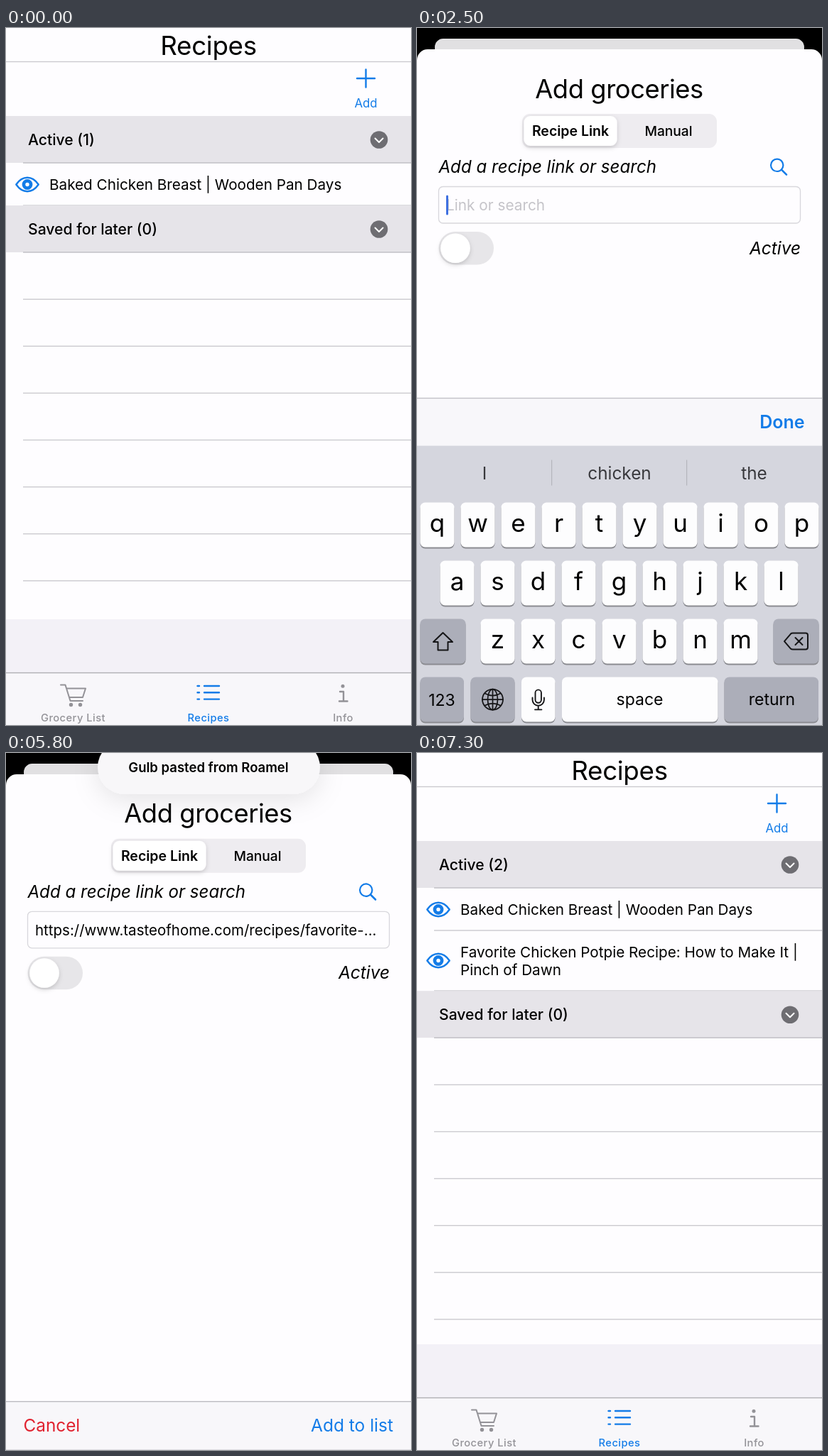
Animation, 570 px wide and 982 px high, one loop 8000 ms. Source, as an HTML page:

```html
<!DOCTYPE html>
<html lang="en">
<head>
<meta charset="utf-8">
<title>Add a recipe</title>
<style>
html, body { margin: 0; width: 100%; height: 100%; overflow: hidden; background: #000; }
svg { display: block; width: 100vw; height: 100vh; font-family: Inter, Roboto, sans-serif; }
text { white-space: pre; }
.line { fill: none; stroke-linecap: round; stroke-linejoin: round; }
</style>
</head>
<body>
<svg id="stage" viewBox="0 0 570 982"></svg>
<script>
const BLUE = '#137ce8', WHITE = '#fefdff', GREY = '#939297', RULE = '#cbcacf', BAR = '#f8f7fa';
const URL_TEXT = 'https://www.tasteofhome.com/recipes/favorite-chicken-potpie/';

// markup helpers
const text = (x, y, size, str, more = '') => `<text x="${x}" y="${y}" font-size="${size}" ${more}>${str}</text>`;
const mid = (x, y, size, str, more = '') => text(x, y, size, str, 'text-anchor="middle" ' + more);
const end = (x, y, size, str, more = '') => text(x, y, size, str, 'text-anchor="end" ' + more);
const rect = (x, y, w, h, fill, r = 0, more = '') =>
  `<rect x="${x}" y="${y}" width="${w}" height="${h}" rx="${r}" fill="${fill}" ${more}/>`;
const rule = (y, x = 24, color = RULE) => rect(x, y - .7, 570 - x, 1.4, color);
const line = (d, color, w = 2, more = '') => `<path class="line" d="${d}" stroke="${color}" stroke-width="${w}" ${more}/>`;
const disc = (x, y, r, fill, more = '') => `<circle cx="${x}" cy="${y}" r="${r}" fill="${fill}" ${more}/>`;
const group = (id, body, more = '') => `<g id="${id}" ${more}>${body}</g>`;

const eye = y => line(`M14.3 ${y}Q21 ${y - 9.7} 30 ${y - 9.7}T45.7 ${y}Q39 ${y + 9.7} 30 ${y + 9.7}T14.3 ${y}Z`, BLUE, 2.4)
  + disc(30, y, 7.4, BLUE) + disc(30, y, 2.7, WHITE);

const section = (y, label) => rect(0, y, 570, 66, '#e6e4e9') + label + rule(y + 66, 24, '#bfbec3')
  + disc(525, y + 33.5, 12.3, '#6e6d72') + line(`M519.5 ${y + 31.5}l5.5 5.5 5.5-5.5`, '#fff');

function list() {
  let rules = '';
  for (let y = 382.2; y < 860; y += 66.1) rules += rule(y);
  return rect(0, -32, 570, 1100, WHITE, 0, 'id="cardShape"')
    + mid(285, 38, 36.7, 'Recipes', 'letter-spacing="-.3"') + rule(47.5, 0)
    + line('M506.5 58.5v25M494 71h25', BLUE, 2.4) + mid(506.5, 112, 16.8, 'Add', `fill="${BLUE}"`)
    + section(124, text(31, 165, 21.15, '', 'font-weight="500" id="count"'))
    + eye(220.5) + text(61, 228, 20.7, 'Baked Chicken Breast | Wooden Pan Days') + rule(250)
    + group('newRow', eye(292.5) + text(61, 288.5, 20.7, 'Favorite Chicken Potpie Recipe: How to Make It |')
      + text(61, 313.5, 20.7, 'Pinch of Dawn') + rule(335))
    + group('later', section(250, text(31, 291, 21.15, 'Saved for later (0)', 'font-weight="500"')) + rules)
    + rect(0, 833, 570, 76, '#f3f1f7') + rect(0, 909, 570, 200, BAR) + rule(908.5, 0, '#b0afb4')
    + line('M77 925.5h6.5l7 22.5h17.5M85 930.5h27l-4 12.5h-19', GREY, 2)
    + disc(91.5, 953.5, 2.7, GREY) + disc(104.5, 953.5, 2.7, GREY)
    + line('M279 927h21M279 936.3h21M279 945.6h21M269.5 927h2.5M269.5 936.3h2.5M269.5 945.6h2.5', BLUE, 2.4)
    + disc(474, 927.3, 2.5, GREY) + line('M470 935h5v13.5M469 948.5h11.5', GREY, 2.4)
    + [['Grocery List', 94.5, GREY], ['Recipes', 285, BLUE], ['Info', 474.5, GREY]]
      .map(([s, x, c]) => mid(x, 977, 14.7, s, `fill="${c}" font-weight="500" letter-spacing=".45"`)).join('')
    + rect(0, -32, 570, 1100, '#000', 0, 'id="dim"');
}

const form = () =>
  mid(284.5, 98.5, 36.3, 'Add groceries', 'letter-spacing="-.4"')
  + rect(148, 121, 274, 48, '#eeecf0', 11) + rect(150.5, 124, 131, 42, '#fff', 9, 'filter="url(#soft)"')
  + mid(216, 152, 19.5, 'Recipe Link', 'font-weight="600"') + mid(354, 152, 19.2, 'Manual', 'font-weight="500"')
  + text(30.5, 204, 24.1, 'Add a recipe link or search', 'font-style="italic"')
  + disc(506.7, 193.3, 8.7, 'none', `stroke="${BLUE}" stroke-width="2.2"`) + line('M513 199.7l7 7', BLUE, 2.6)
  + rect(30.5, 223.5, 509, 51.5, WHITE, 6, 'stroke="#d8d7dc" stroke-width="1.3"')
  + text(41, 257, 20.8, 'Link or search', 'fill="#c5c4c9" id="hint"')
  + `<g clip-path="url(#field)">${end(526, 257, 20.5, URL_TEXT, 'id="link"')}</g>`
  + text(41, 257, 20.5, URL_TEXT.slice(0, 45) + '...', 'id="cutLink"')
  + rect(41, 235.5, 3, 28, '#3e6fe0', 1.5, 'id="caret"')
  + rect(30.5, 287, 77.5, 46.5, '#e7e6e9', 23.2) + disc(54, 310.2, 20.8, '#fff', 'filter="url(#soft)"')
  + end(540, 318.5, 24.4, 'Active', 'font-style="italic"');

const toolbar = () => rect(0, 916, 570, 200, BAR) + rule(916.5, 0, '#bdbcc1')
  + text(24.5, 959, 24.3, 'Cancel', 'fill="#e0222f"') + end(545, 959, 24.5, 'Add to list', `fill="${BLUE}"`);

function keyboard() {
  const cap = (x, y, w, fill = '#fdfdfe') => rect(x, y + 2, w, 63, '#8b8c91', 7) + rect(x, y, w, 63, fill, 7);
  const dark = (x, y, w) => cap(x, y, w, '#acaeb9');
  const row = (letters, x0, y) => [...letters].map((c, i) =>
    cap(x0 + 57 * i, y, 48) + mid(x0 + 24 + 57 * i, y + 41.5, 35, c)).join('');
  const word = (x, s) => mid(x, 635, 24.3,
    [...s].map((c, i) => `<tspan data-delay="${i / s.length}">${c}</tspan>`).join(''), 'fill="#38383c"');
  const ink = '#151517';
  return rect(0, 521, 570, 68, BAR) + rect(0, 521, 570, 68, 'url(#edge)', 0, 'id="sheen"') + rule(521, 0, '#c2c1c6')
    + end(545.5, 563.5, 25, 'Done', `fill="${BLUE}" font-weight="600"`)
    + rect(0, 588, 570, 420, '#d5d6de')
    + rect(189, 608, 1.2, 36, '#b4b5bc') + rect(379, 608, 1.2, 36, '#b4b5bc')
    + group('words', word(95, 'I') + word(285, 'chicken') + word(474.5, 'the'))
    + row('qwertyuiop', 4.5, 668) + row('asdfghjkl', 32.5, 750) + row('zxcvbnm', 89.5, 832)
    + dark(4.5, 832, 64) + line('M36.5 851.5L50 864.5H43.5V876H29.5V864.5H23Z', ink)
    + dark(501.5, 832, 64)
    + line('M517 863.5L526 853Q527 852 529 852H547Q550 852 550 855V872Q550 875 547 875H529Q527 875 526 874ZM532.5 858.5l10 10m0-10l-10 10', ink)
    + dark(4.5, 914, 61.5) + mid(35, 954, 23, '123')
    + dark(75.5, 914, 62)
    + line('M92 945.5h29M106.5 931v29M95.5 937q11 6 22 0M95.5 954q11-6 22 0', ink, 1.7)
    + disc(106.5, 945.5, 14.5, 'none', `stroke="${ink}" stroke-width="1.8"`)
    + `<ellipse cx="106.5" cy="945.5" rx="7" ry="14.5" fill="none" stroke="${ink}" stroke-width="1.7"/>`
    + cap(147, 914, 47.5)
    + line('M166.5 936a4.2 4.2 0 0 1 8.4 0v10a4.2 4.2 0 0 1-8.4 0ZM162.5 943v3a8.2 8.2 0 0 0 16.4 0v-3M170.7 954.5v5M166 959.8h9.4', ink, 1.9)
    + cap(204, 914, 219.5) + mid(313.5, 953, 23, 'space')
    + dark(432.5, 914, 132.5) + mid(499.5, 953, 23, 'return');
}

let spokes = '';
for (let i = 0; i < 8; i++)
  spokes += line('M0-13.5v-9', '#000', 8, `data-spoke="${i}" transform="rotate(${45 * i})"`);

stage.innerHTML = `<defs>
  <filter id="soft" x="-30%" y="-30%" width="160%" height="170%"><feDropShadow dx="0" dy="2.5" stdDeviation="3" flood-opacity=".17"/></filter>
  <filter id="far" x="-30%" y="-60%" width="160%" height="260%"><feDropShadow dx="0" dy="8" stdDeviation="18" flood-opacity=".1"/></filter>
  <clipPath id="field"><rect x="41" y="224" width="489" height="50"/></clipPath>
  <linearGradient id="edge"><stop stop-color="#d9d8db"/><stop offset=".06" stop-color="#ececee"/><stop offset=".15" stop-color="#fefdff"/>
    <stop offset=".92" stop-color="#fefdff"/><stop offset="1" stop-color="#d9d8db"/></linearGradient>
</defs>`
  + rect(0, 0, 570, 982, '#000') + group('card', list())
  + group('sheet', rect(0, 30, 570, 1100, WHITE, 15) + group('form', form())
    + group('spinner', spokes, 'transform="translate(283.5 547)"') + group('tools', toolbar()))
  + group('keys', keyboard())
  + group('popup', `<path d="M25 122H111.5a10 10 0 0 1 10 10V168a10 10 0 0 1-10 10H57L42 191 28 178H25a10 10 0 0 1-10-10V132a10 10 0 0 1 10-10Z" fill="#060607"/>`
    + mid(68, 157.5, 21.3, 'Paste', 'fill="#fff"'))
  + group('banner', rect(129, -18, 313, 76, '#f8f7f9', 38, 'filter="url(#far)"')
    + mid(285, 26.5, 18.5, 'Gulb pasted from Roamel', 'font-weight="600"'));

const el = id => document.getElementById(id);
const clamp = v => Math.max(0, Math.min(1, v));
const spring = (t, start, rate) => {
  const x = Math.max(0, t - start) * rate / 1000;
  return 1 - (1 + x) * Math.exp(-x);
};
const shift = (id, y) => el(id).setAttribute('transform', `translate(0 ${y})`);
const fade = (node, v) => node.setAttribute('opacity', v);
const letters = [...document.querySelectorAll('[data-delay]')];
const arms = [...document.querySelectorAll('[data-spoke]')];

const PASTE = 4000, DONE = 5400, SAVE = 6150, CLOSE = 6560;

function draw(t) {
  const open = spring(t, 740, 13.3) - spring(t, CLOSE, 16);
  const typing = spring(t, 1999, 18) - spring(t, DONE, 18);
  const lift = spring(t, 2580, 18) - spring(t, DONE, 18);
  const saved = t >= CLOSE, pasted = t >= PASTE, editing = t >= 1950 && t < DONE;

  // list screen recedes behind the sheet
  const s = 1 - .088 * open;
  el('card').setAttribute('transform', `translate(${285 * (1 - s)} ${47 * open - 32}) scale(${s}) translate(0 32)`);
  el('cardShape').setAttribute('rx', 13 * open);
  el('dim').setAttribute('rx', 13 * open);
  fade(el('dim'), .115 * open);
  el('count').textContent = `Active (${saved ? 2 : 1})`;
  fade(el('newRow'), +saved);
  shift('later', saved ? 85.2 : 0);

  shift('sheet', 954 * (1 - open));
  shift('form', -30.3 * lift);
  shift('tools', -462 * lift);
  shift('keys', 464 * (1 - typing));
  fade(el('sheen'), clamp(lift));

  fade(el('hint'), +!pasted);
  fade(el('link'), +(pasted && editing));
  fade(el('cutLink'), +(pasted && !editing));
  el('caret').setAttribute('x', pasted ? 526.5 : 41);
  fade(el('caret'), +(editing && (t - 50) % 1000 < 700));
  fade(el('words'), +!pasted);
  for (const n of letters) fade(n, clamp((t - 1990) / 160 - .95 * n.dataset.delay));

  fade(el('popup'), clamp((t - 3000) / 150) * clamp((PASTE - t) / 150));
  shift('banner', -120 * (1 - spring(t, 4150, 18) + spring(t, 6620, 18)));

  fade(el('spinner'), +(t >= SAVE));
  const lead = Math.floor(t / 100) + 4;
  for (const n of arms) {
    const age = (lead - n.dataset.spoke) % 8;
    fade(n, Math.max(.13, .37 - .075 * age));
  }
}

function tick(now) {
  draw(now % 8000);
  requestAnimationFrame(tick);
}
draw(0);
requestAnimationFrame(tick);
</script>
</body>
</html>
```
